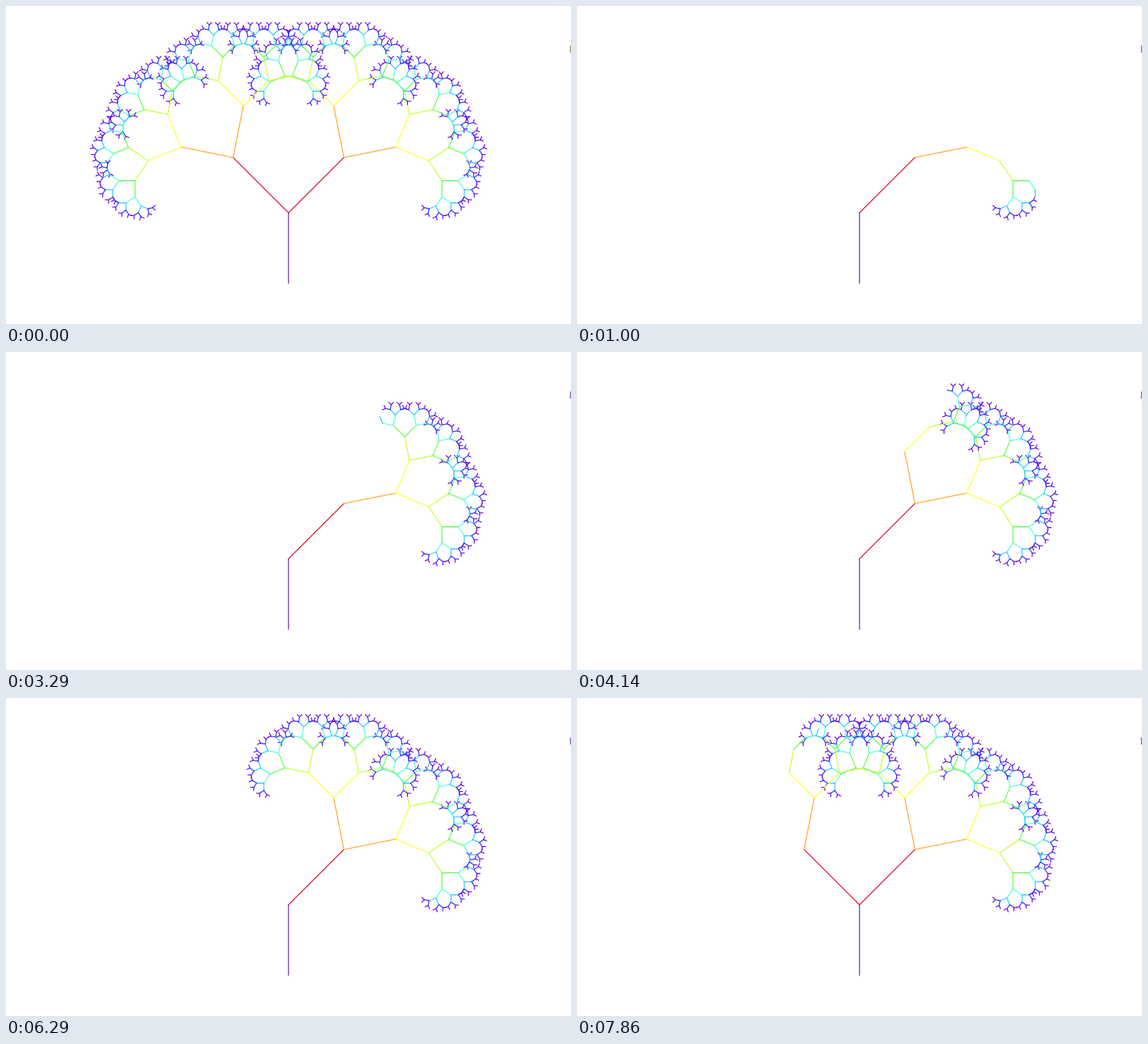
Animation, 800 px wide and 451 px high, one loop 8000 ms. Source, as an HTML page with a canvas:

```html
<!DOCTYPE html>
<html lang="en">
<head>
<meta charset="utf-8">
<title>Fractal tree</title>
<style>
  html, body { margin: 0; width: 100%; height: 100%; overflow: hidden; background: #fff; }
  canvas { display: block; }
</style>
</head>
<body>
<canvas id="stage" width="800" height="451"></canvas>
<script>
const ctx = document.getElementById('stage').getContext('2d');

const LOOP = 8000, STEPS = 56;
const RESTART_STEP = 4, BRANCHES_PER_STEP = 12.8;
const RATIO = 0.674, FIRST_LENGTH = 111;
const FORK = { x: 400, y: 293.3 }, TRUNK_BOTTOM = 393.3;
const TRUNK_COLOR = '#6a22ae';
const COLORS = ['#e0183a', '#ffa62e', '#ffff3c', '#c4ff3c', '#62ff52',
                '#55ffdc', '#38c4ff', '#2a38f0', '#6c0ae0'];
const rad = degrees => degrees * Math.PI / 180;

// Branches in drawing order: depth first, right side before left.
const branches = [];
function grow(x, y, heading, length, level) {
  if (level === COLORS.length) return;
  for (const side of [-1, 1]) {
    const angle = rad(heading + side * 45);
    const endX = x + length * Math.cos(angle);
    const endY = y - length * Math.sin(angle);
    branches.push({ x, y, endX, endY, color: COLORS[level] });
    grow(endX, endY, heading + side * 33.75, length * RATIO, level + 1);
  }
}
grow(FORK.x, FORK.y, 90, FIRST_LENGTH, 0);

function line(x1, y1, x2, y2, color) {
  ctx.strokeStyle = color;
  ctx.beginPath();
  ctx.moveTo(x1, y1);
  ctx.lineTo(x2, y2);
  ctx.stroke();
}

function draw(time) {
  const step = Math.min(STEPS - 1, Math.floor((time + 5) * 7 / 1000));
  // The finished tree stays until the next one starts.
  const finished = step < RESTART_STEP;
  const count = finished
    ? branches.length
    : Math.max(0, Math.floor(BRANCHES_PER_STEP * (step - RESTART_STEP) - 0.1));

  ctx.fillStyle = '#fff';
  ctx.fillRect(0, 0, 800, 451);
  ctx.lineWidth = 1.3;
  ctx.lineCap = 'round';

  line(FORK.x, TRUNK_BOTTOM, FORK.x, FORK.y, TRUNK_COLOR);
  for (const b of branches.slice(0, count)) line(b.x, b.y, b.endX, b.endY, b.color);

  // Label cut off by the right edge
  ctx.font = '14px "Liberation Sans", sans-serif';
  ctx.fillStyle = finished ? '#998a5c' : '#7a5cba';
  ctx.fillText('D', 797.4, 66);
}

function tick() {
  draw(performance.now() % LOOP);
  requestAnimationFrame(tick);
}
tick();
</script>
</body>
</html>
```
